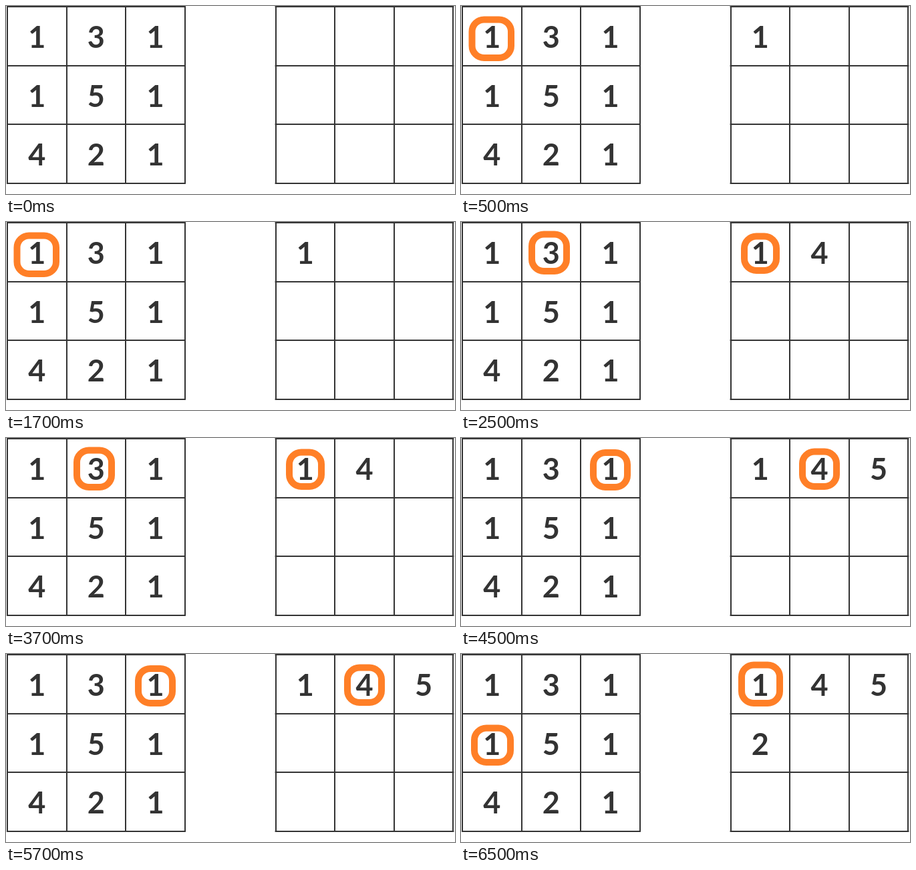
These frames come from a looping animation (672 by 283 pixels, 8000 ms). An HTML page with a canvas:

```html
<!DOCTYPE html>
<html lang="en">
<head>
<meta charset="utf-8">
<title>Grid path sums</title>
<style>
  html, body { margin: 0; width: 100%; height: 100%; overflow: hidden; background: #fff; }
  canvas { display: block; }
</style>
</head>
<body>
<canvas id="stage" width="672" height="283"></canvas>
<script>
const ctx = document.getElementById('stage').getContext('2d');
const LOOP = 8000;
const CELL = 88.6;
const LEFT = 2, RIGHT = 403.6, TOP = 1;
const INK = '#333', ORANGE = '#ff7f27';

const costs = [1, 3, 1, 1, 5, 1, 4, 2, 1];
const sums = [1, 4, 5, 2];

// Rings are outer boxes: left, top, right, bottom.
const steps = [
  { at: 0, filled: 0, rings: [] },
  { at: 500, filled: 1, rings: [[11.5, 15.5, 80, 83]] },
  { at: 2500, filled: 2, rings: [[101, 13.5, 163, 79], [419, 16.5, 477, 78]] },
  { at: 4500, filled: 3, rings: [[193, 17, 254, 79], [506, 15.5, 567, 78]] },
  { at: 6500, filled: 4, rings: [[15, 106.5, 79, 168], [415, 11.5, 482, 79]] }
];

function drawGrid(x, values) {
  ctx.strokeStyle = INK;
  ctx.lineWidth = 2;
  ctx.beginPath();
  const size = 3 * CELL;
  for (let i = 0; i < 4; i++) {
    const gx = Math.round(x + i * CELL), gy = Math.round(TOP + i * CELL);
    ctx.moveTo(gx, TOP - 1);
    ctx.lineTo(gx, TOP + size + 1);
    ctx.moveTo(x - 1, gy);
    ctx.lineTo(x + size + 1, gy);
  }
  ctx.stroke();

  ctx.fillStyle = INK;
  values.forEach((value, i) => {
    const col = i % 3, row = Math.floor(i / 3);
    ctx.fillText(value, x + (col + 0.5) * CELL, TOP + row * CELL + 62);
  });
}

function drawRing([x0, y0, x1, y1]) {
  const w = 10;
  ctx.strokeStyle = ORANGE;
  ctx.lineWidth = w;
  ctx.beginPath();
  ctx.roundRect(x0 + w / 2, y0 + w / 2, x1 - x0 - w, y1 - y0 - w, 18);
  ctx.stroke();
}

function draw(time) {
  const t = time % LOOP;
  const step = steps.filter(s => s.at <= t).pop();
  ctx.fillStyle = '#fff';
  ctx.fillRect(0, 0, 672, 283);
  ctx.font = 'bold 45px Lato, Carlito, sans-serif';
  ctx.textAlign = 'center';
  ctx.textBaseline = 'alphabetic';
  drawGrid(LEFT, costs);
  drawGrid(RIGHT, sums.slice(0, step.filled));
  step.rings.forEach(drawRing);
}

const start = performance.now();
function tick() {
  draw(performance.now() - start);
  requestAnimationFrame(tick);
}
tick();
</script>
</body>
</html>
```
